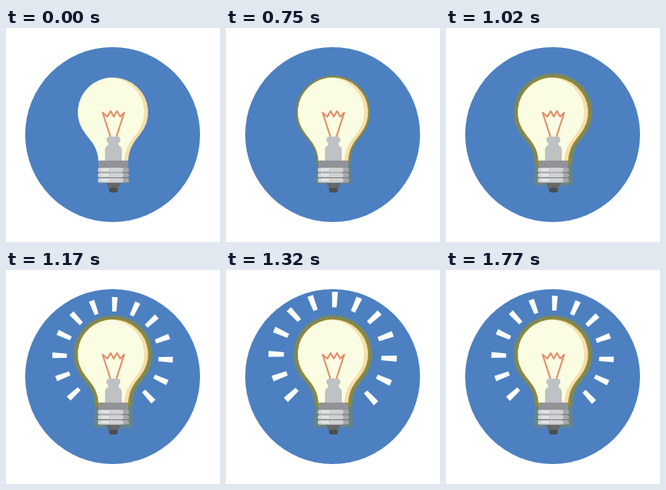
Animation, 268 px wide and 268 px high, one loop 1.8 s. Source, as an HTML page with a canvas:

```html
<!DOCTYPE html>
<html lang="en">
<head>
<meta charset="utf-8">
<title>Light bulb</title>
<style>
  html, body { margin: 0; width: 100%; height: 100%; overflow: hidden; background: #fff; }
  canvas { display: block; width: 268px; height: 268px; }
</style>
</head>
<body>
<canvas id="stage" width="268" height="268"></canvas>
<script>
const ctx = document.getElementById('stage').getContext('2d');
const LOOP = 1800, STEP = 30;
const RAYS = 13, RAY_IN = 1010, RAY_OUT = 1716, RAY_TIME = 425;

const glass = new Path2D('M116 167C115 150 108 143 100 133A44 43.5 0 1 1 168 133C160 143 154 150 153 167Z');
const socket = new Path2D('M116 167H153L155 193H114Z');
const ray = new Path2D('M57 -2.6L75 -3.5V3.5L57 2.6Z');
const stem = new Path2D('M124 166V153Q124 148 128 147V144Q125 142 126 138Q127 136 130 136H140Q143 136 143 139Q144 142 141 144V147Q145 148 145 153V166Z');
const filament = new Path2D('M131 137L121 106L127 111L131 104L135 111L139 104L143 111L148 106L138 137');
const tip = new Path2D('M125 193H144L140 202H129Z');

const clamp = v => Math.min(1, Math.max(0, v));
const backIn = p => 2.70158 * p ** 3 - 1.70158 * p ** 2;
const backOut = p => 1 - backIn(1 - p);

function fill(path, color) {
  ctx.fillStyle = color;
  ctx.fill(path);
}

function box(x, y, w, h, color, radius = 0) {
  ctx.fillStyle = color;
  ctx.beginPath();
  ctx.roundRect(x, y, w, h, radius);
  ctx.fill();
}

function rayScale(t) {
  if (t < RAY_OUT) return backOut(clamp((t - RAY_IN) / RAY_TIME));
  return 1 - backIn((t - RAY_OUT) / RAY_TIME);
}

// Rays fan out around the bulb but scale from the stage centre.
function drawRays(scale) {
  if (scale <= 0) return;
  ctx.save();
  ctx.translate(133.5, 134);
  ctx.scale(scale, scale);
  ctx.translate(0, -24.5);
  ctx.rotate(136.8 * Math.PI / 180);
  for (let i = 0; i < RAYS; i++) {
    fill(ray, '#fff');
    ctx.rotate(22.55 * Math.PI / 180);
  }
  ctx.restore();
}

function glow(path, alpha, amount) {
  if (amount <= 0) return;
  ctx.save();
  ctx.lineJoin = 'round';
  ctx.strokeStyle = '#a28e0d';
  ctx.globalAlpha = alpha;
  for (let k = 1; k <= 6; k++) {
    ctx.lineWidth = 2 * k * amount;
    ctx.stroke(path);
  }
  ctx.restore();
}

function drawBase() {
  fill(tip, '#66686b');
  box(129, 200, 11, 6, '#4c4e50', 3);
  box(117, 166, 36, 28, '#77797c');
  box(116, 166, 37, 9, '#919396', 1);
  for (const y of [175, 181.5, 188]) {
    box(115, y, 39, 5.5, '#a5a7aa', 2.5);
    box(115, y, 32, 5.5, '#cfd1d3', 2.5);
    box(119, y + 1, 10, 3, '#e3e4e5', 1);
  }
}

function drawGlass() {
  fill(glass, '#f7dfaa');
  ctx.save();
  ctx.clip(glass);
  ctx.translate(-5, 0);
  fill(glass, '#fafde2');
  ctx.restore();
  // The offset highlight leaves the left edge to the main fill colour.
  ctx.strokeStyle = '#e58a66';
  ctx.lineWidth = 2;
  ctx.lineJoin = 'round';
  ctx.stroke(filament);
  fill(stem, '#bfc2c4');
}

function draw(t) {
  const light = clamp((t - 480) / 540);
  ctx.fillStyle = '#fff';
  ctx.fillRect(0, 0, 268, 268);
  box(24, 24, 219, 219, '#4c80c0', 109.5);
  drawRays(rayScale(t));
  glow(socket, 0.08, light);
  glow(glass, 0.22, light);
  drawGlass();
  drawBase();
}

function tick() {
  const t = performance.now() % LOOP;
  draw(Math.floor(t / STEP) * STEP);
  requestAnimationFrame(tick);
}
tick();
</script>
</body>
</html>
```
